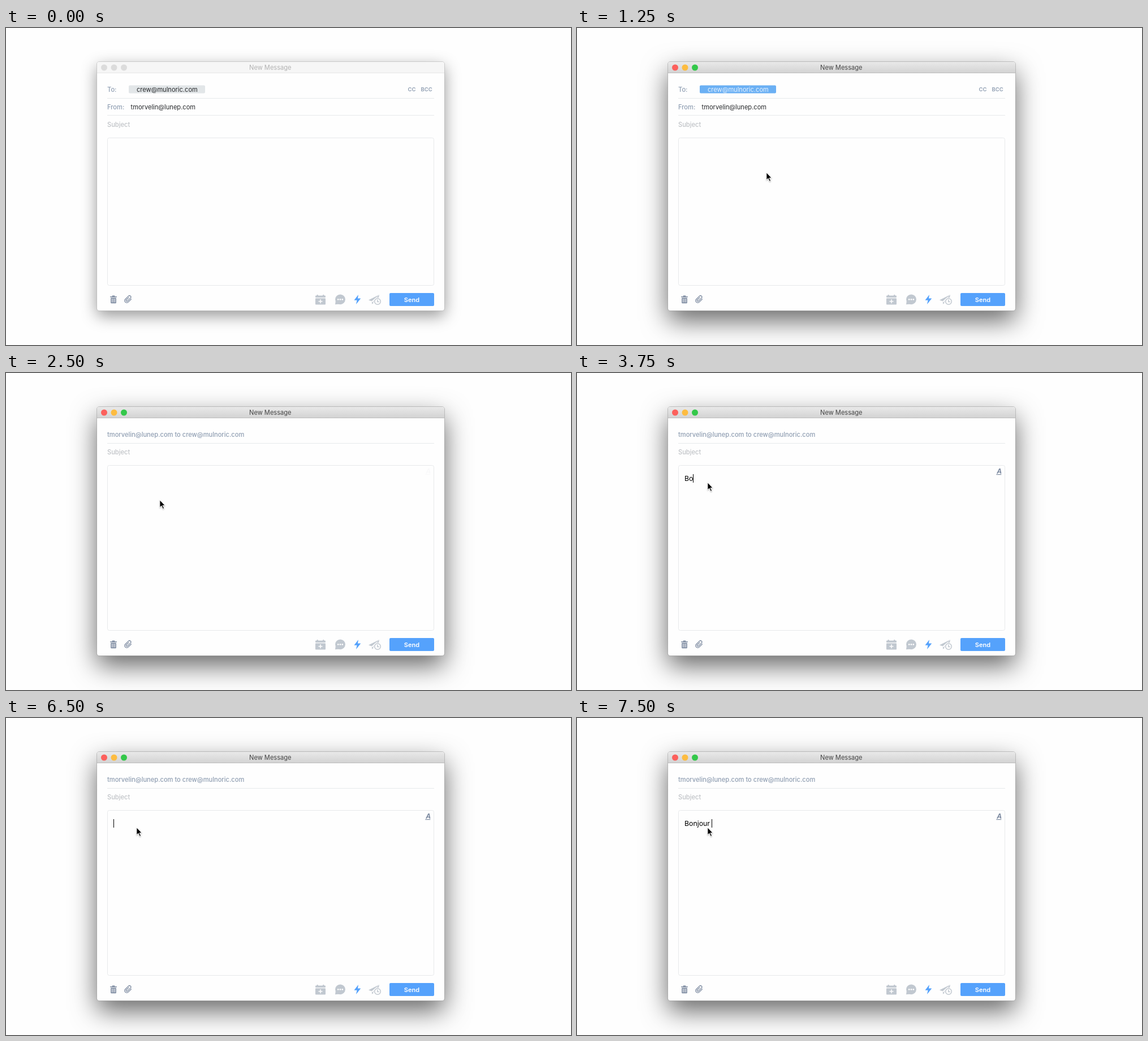
Write an HTML page with a canvas that moves like this. It is 999 px wide and 561 px high and loops after 8000 ms.

```html
<!DOCTYPE html>
<html lang="en">
<head>
<meta charset="utf-8">
<title>New Message</title>
<style>
html, body { margin: 0; width: 100%; height: 100%; overflow: hidden; background: #fefefe; }
canvas { display: block; width: 999px; height: 561px; }
</style>
</head>
<body>
<canvas id="stage"></canvas>
<script>
const W = 999, H = 561, LOOP = 8000;
const TO = 'crew@mulnoric.com', FROM = 'tmorvelin@lunep.com';
const SLATE = '#7c8aa0', LABEL = '#8f9eb2', PALE = '#c1c8d0', BLUE = '#55a2fc', RULE = '#e7e9eb';

const canvas = document.getElementById('stage');
const ctx = canvas.getContext('2d');
const dpr = window.devicePixelRatio || 1;
canvas.width = W * dpr;
canvas.height = H * dpr;

// [start time, typed text, caret visible]
const typing = [
  [0, '', false], [2750, '', true], [3250, '', false], [3500, 'B', true],
  [3750, 'Bo', true], [4000, 'Bojou', true], [4500, 'Boj', true], [4750, 'Bo', true],
  [5250, '', true], [6000, '', false], [6500, '', true], [6750, 'B', true],
  [7000, 'Bon', true], [7250, 'Bonjo', true], [7500, 'Bonjour ', true]
];
// [start time, x, y] of the pointer tip
const pointer = [
  [0, null], [750, 412, 145], [1000, 335, 256], [1500, 272, 222], [1750, 272, 225], [2750, 231, 194]
];
// [start time, opacity] of the format button
const format = [[0, 0], [1750, 1], [2500, 0.04], [2750, 0.6], [3000, 1]];

const at = (track, t) => track.filter(k => k[0] <= t).pop();

function rect(x, y, w, h, r, fill, stroke) {
  ctx.beginPath();
  ctx.roundRect(x, y, w, h, r);
  if (fill) { ctx.fillStyle = fill; ctx.fill(); }
  if (stroke) { ctx.strokeStyle = stroke; ctx.lineWidth = 1; ctx.stroke(); }
}

function disc(x, y, r, fill) {
  ctx.beginPath();
  ctx.arc(x, y, r, 0, Math.PI * 2);
  ctx.fillStyle = fill;
  ctx.fill();
}

function poly(points, fill) {
  ctx.beginPath();
  points.forEach(([x, y]) => ctx.lineTo(x, y));
  ctx.closePath();
  ctx.fillStyle = fill;
  ctx.fill();
}

function text(s, x, y, color, weight = 400, size = 11.1, align = 'left') {
  ctx.font = `${weight} ${size}px Inter, sans-serif`;
  ctx.textAlign = align;
  ctx.fillStyle = color;
  ctx.fillText(s, x, y);
}

function faded(alpha, draw) {
  ctx.save();
  ctx.globalAlpha = alpha;
  draw();
  ctx.restore();
}

function rule(y) {
  ctx.fillStyle = RULE;
  ctx.fillRect(179, y, 578, 1);
}

function shadow(dy, blur, alpha) {
  ctx.save();
  ctx.shadowColor = `rgba(0,0,0,${alpha})`;
  ctx.shadowBlur = blur * dpr;
  ctx.shadowOffsetY = dy * dpr;
  rect(161, 60, 614, 440, 4, '#fff');
  ctx.restore();
}

function windowFrame(active) {
  if (active) shadow(18, 46, 0.6);
  else shadow(9, 28, 0.42);
  rect(160.5, 59.5, 615, 441, 4.5, '#fefefe', active ? 'rgba(0,0,0,.22)' : 'rgba(0,0,0,.16)');
  let bar = '#f6f6f6';
  if (active) {
    bar = ctx.createLinearGradient(0, 60, 0, 80);
    bar.addColorStop(0, '#e9e9e9');
    bar.addColorStop(1, '#d2d2d2');
  }
  rect(161, 60, 614, 20, [4, 4, 0, 0], bar);
  ctx.fillStyle = active ? '#bdbdbd' : '#e6e6e6';
  ctx.fillRect(161, 79, 614, 1);
  const lights = active ? ['#fc605c', '#fdbc40', '#34c84a'] : ['#dcdcdc', '#dcdcdc', '#dcdcdc'];
  lights.forEach((c, i) => disc(173.5 + i * 17.5, 70, 5.5, c));
  text('New Message', 467.3, 74.3, active ? '#444' : '#b2b2b2', 400, 11.1, 'center');
}

function trash() {
  rect(184, 475, 12, 1.6, 0.5, SLATE);
  rect(187.5, 473.4, 5, 2, 0.8, SLATE);
  rect(185.2, 477.6, 9.6, 9.6, 1, SLATE);
  ctx.fillStyle = '#fefefe';
  for (let i = 0; i < 3; i++) ctx.fillRect(187 + i * 2.5, 479, 1, 6.6);
}

function clip() {
  ctx.save();
  ctx.translate(216, 480);
  ctx.rotate(Math.PI / 4);
  ctx.strokeStyle = SLATE;
  ctx.lineWidth = 1.3;
  ctx.lineCap = 'round';
  ctx.beginPath();
  ctx.moveTo(3.6, -4);
  ctx.lineTo(3.6, 3.6);
  ctx.arc(0, 3.6, 3.6, 0, Math.PI);
  ctx.lineTo(-3.6, -4.4);
  ctx.arc(-1.1, -4.4, 2.5, Math.PI, 0);
  ctx.lineTo(1.4, 3.2);
  ctx.arc(0, 3.2, 1.4, 0, Math.PI);
  ctx.lineTo(-1.4, -3);
  ctx.stroke();
  ctx.restore();
}

function calendar() {
  rect(547, 473.5, 18, 3.6, 1, PALE);
  rect(549.5, 472, 2.4, 3, 0.6, PALE);
  rect(560, 472, 2.4, 3, 0.6, PALE);
  rect(547, 478.2, 18, 11.3, 1, PALE);
  ctx.fillStyle = '#fefefe';
  ctx.fillRect(552.5, 483, 7, 1.5);
  ctx.fillRect(555.25, 480.2, 1.5, 7);
}

function bubble() {
  disc(591, 480.3, 8.9, PALE);
  poly([[583, 482], [582, 489.2], [590, 488.5]], PALE);
  for (let i = -1; i < 2; i++) disc(591 + i * 3.8, 480.4, 1.35, '#fefefe');
}

function plane() {
  poly([[641, 481.5], [660, 472], [646.5, 483.4]], PALE);
  poly([[660, 472], [656.5, 488], [648.5, 484.2]], PALE);
  poly([[646.8, 484.4], [650, 486], [647.2, 488.8]], PALE);
  disc(657, 484, 7, '#fefefe');
  ctx.strokeStyle = PALE;
  ctx.lineWidth = 1.5;
  ctx.beginPath();
  ctx.arc(657, 484, 5.3, 0, Math.PI * 2);
  ctx.moveTo(656.8, 480.8);
  ctx.lineTo(656.8, 484.4);
  ctx.lineTo(659.8, 484.4);
  ctx.stroke();
}

function toolbar() {
  trash();
  clip();
  calendar();
  bubble();
  poly([[623, 472], [615.5, 481.8], [620.5, 481.8], [619, 489], [627.3, 478.6], [622, 478.6]], BLUE);
  plane();
  rect(678, 469, 79, 23, 2, BLUE);
  text('Send', 717.4, 485, '#fff', 600, 11, 'center');
}

function copyButtons() {
  text('CC', 710.6, 112, LABEL, 600, 9.5);
  text('BCC', 733.5, 112, LABEL, 600, 9.5);
}

function openHeader(active) {
  text('To:', 179, 113, LABEL, 500);
  rect(217, 101.5, 135, 14, 2, active ? '#6bb0f4' : '#e2e6e8');
  text(TO, 231, 113, active ? '#e9f4ff' : '#26282b');
  copyButtons();
  rule(124);
  text('From:', 179, 144, LABEL, 500);
  text(FROM, 220.6, 144, '#26282b');
  rule(154);
  text('Subject', 179, 174.6, '#bfc2c6', 500);
  rect(179.5, 194.5, 577, 261, 3, null, RULE);
}

function foldedHeader(t) {
  const fading = t < 2000;
  text(`${FROM} to ${TO}`, 179, 113, LABEL, 500);
  rule(124);
  text('Subject', 179, 144, fading ? '#aeb3b8' : '#bfc2c6', 500);
  if (fading) {
    faded(0.05, copyButtons);
    faded(0.12, () => text(FROM, 220.6, 144, '#26282b'));
  }
  rect(179.5, 163.5, 577, 292, 3, null, RULE);
  if (t < 2500) {
    ctx.fillStyle = '#b3d7ff';
    ctx.fillRect(190, 179, 556, 30);
  }
  faded(at(format, t)[1], () => {
    text('A', 746.8, 178, SLATE, 'italic 700', 12, 'center');
    ctx.fillRect(741.3, 179, 9, 1.2);
  });
}

function typed(t) {
  const [, words, caret] = at(typing, t);
  text(words, 190, 191, '#000', 400, 12.3);
  if (caret) ctx.fillRect(190 + Math.floor(ctx.measureText(words).width), 179, 1, 15);
}

function arrow(x, y) {
  ctx.save();
  ctx.translate(x, y);
  ctx.shadowColor = 'rgba(0,0,0,.3)';
  ctx.shadowBlur = 2 * dpr;
  ctx.shadowOffsetY = dpr;
  poly([[-0.5, -1], [-0.5, 14], [2.9, 11], [5.3, 16.2], [8, 15], [5.8, 10], [10, 9.8]], '#fff');
  ctx.shadowColor = 'transparent';
  poly([[0.4, 0.8], [0.4, 12], [3.2, 9.5], [5.7, 14.9], [7, 14.3], [4.5, 9.1], [8.2, 8.9]], '#000');
  ctx.restore();
}

function render(t) {
  const active = t >= 1250;
  ctx.setTransform(dpr, 0, 0, dpr, 0, 0);
  ctx.fillStyle = '#fefefe';
  ctx.fillRect(0, 0, W, H);
  windowFrame(active);
  if (t < 1750) openHeader(active);
  else foldedHeader(t);
  toolbar();
  typed(t);
  const [, x, y] = at(pointer, t);
  if (x !== null) arrow(x, y);
}

const start = performance.now();
function tick() {
  render((performance.now() - start) % LOOP);
  requestAnimationFrame(tick);
}
tick();
</script>
</body>
</html>
```
